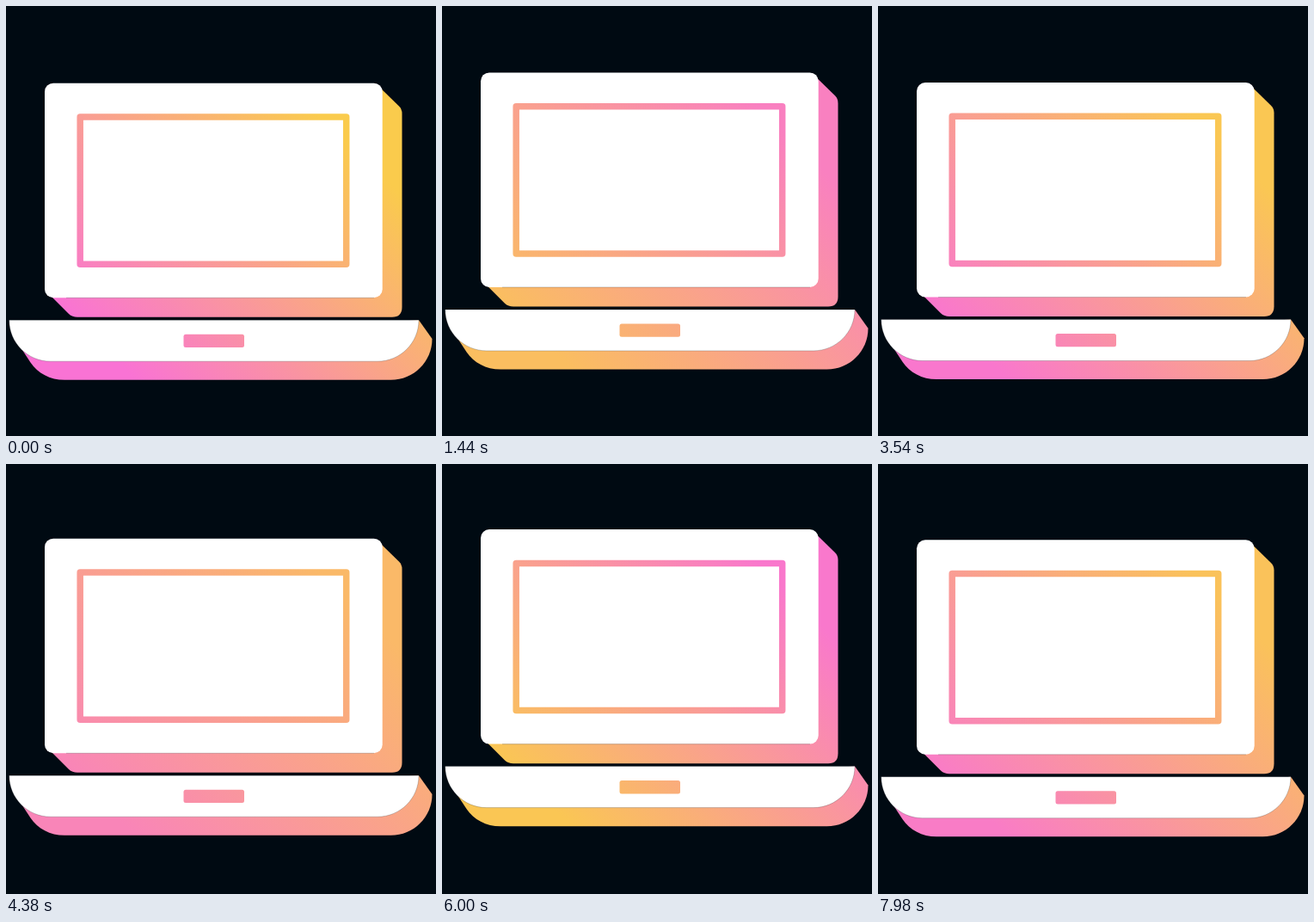
Write an HTML page that moves like this. It is 500x500 px and loops after 8.01 s.

```html
<!DOCTYPE html>
<html lang="en">
<head>
<meta charset="utf-8">
<title>Floating laptop</title>
<style>
  html, body { margin: 0; width: 100%; height: 100%; overflow: hidden; background: #000a12; }
  svg { display: block; width: 100%; height: 100%; }
</style>
</head>
<body>
<svg viewBox="0 0 500 500">
  <defs>
    <linearGradient id="glow" gradientUnits="userSpaceOnUse" x1="140" y1="425" x2="400" y2="160">
      <stop id="low" offset="0"/>
      <stop id="high" offset="1"/>
    </linearGradient>
  </defs>
  <g id="laptop">
    <!-- screen -->
    <path fill="url(#glow)" d="M435 95 L457 116.5 Q460.5 120 460.5 125 V350 Q460.5 361.8 449 361.8 H83 Q77 361.8 73 358 L52 337 Z"/>
    <rect x="45" y="89.7" width="392.7" height="249.5" rx="10" fill="#fff"/>
    <path d="M70 339.3 H428" stroke="#000a12" stroke-opacity=".35" stroke-width=".6"/>
    <rect x="86.2" y="129" width="309.5" height="171.2" fill="none" stroke="url(#glow)" stroke-width="7.5" stroke-linejoin="round"/>
    <!-- base -->
    <path fill="url(#glow)" d="M480 365.2 L495.5 387 C495.5 413.5 474 434.8 447.5 434.8 H68 C51 434.8 37 427 28.5 414.5 L17 397 L100 390 Z"/>
    <path fill="#fff" stroke="#000a12" stroke-opacity=".35" stroke-width=".6" d="M3.7 365.2 H480 C480 391.7 458.5 413.2 432 413.2 H51.7 C25.2 413.2 3.7 391.7 3.7 365.2 Z"/>
    <rect x="206.5" y="381.7" width="70.5" height="15.3" rx="2.5" fill="url(#glow)"/>
  </g>
</svg>
<script>
  const LOOP = 8010, PERIOD = 3780, START = 30, RISE = 14.5;
  const YELLOW = [250, 203, 76], PINK = [249, 115, 212];
  const [laptop, low, high] = ['laptop', 'low', 'high'].map(id => document.getElementById(id));

  const mix = (a, b, k) => `rgb(${a.map((v, i) => Math.round(v + (b[i] - v) * k))})`;

  function draw(now) {
    const t = now % LOOP;
    const k = (1 - Math.cos((t - START) / PERIOD * 2 * Math.PI)) / 2;
    laptop.setAttribute('transform', `translate(0 ${-RISE * k})`);
    low.setAttribute('stop-color', mix(PINK, YELLOW, k));
    high.setAttribute('stop-color', mix(YELLOW, PINK, k));
  }

  const begin = performance.now();
  function tick() {
    draw(performance.now() - begin);
    requestAnimationFrame(tick);
  }
  tick();
</script>
</body>
</html>
```
